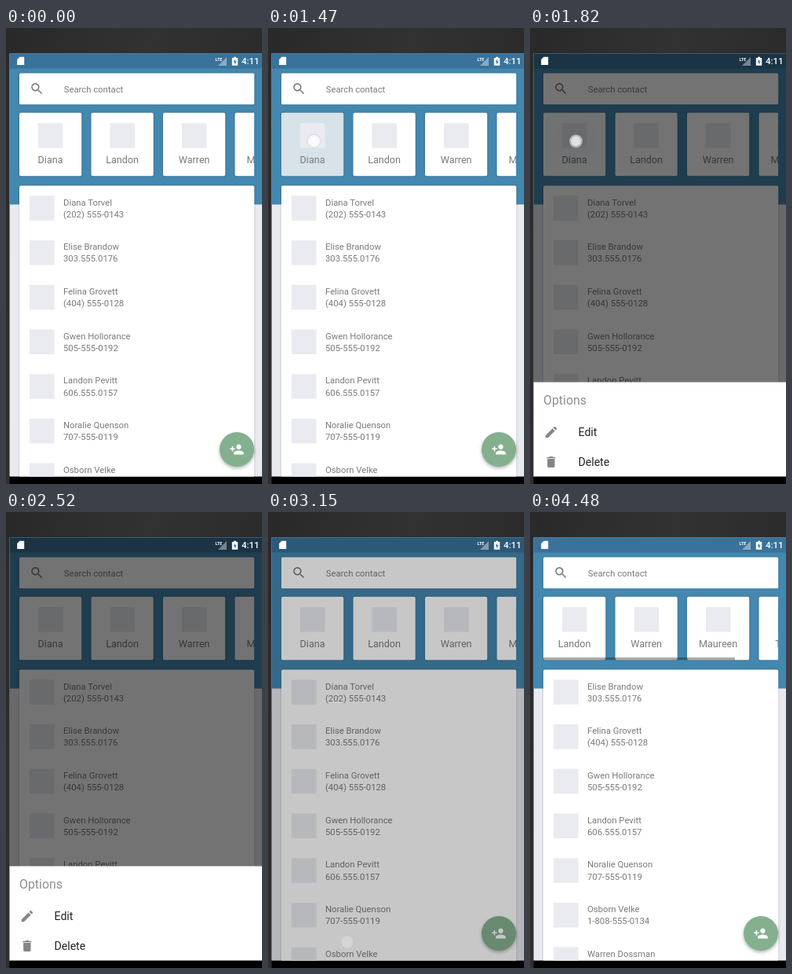
Animation of 326x580 px, one loop 4760 ms. Source, as an HTML page:

```html
<!DOCTYPE html>
<html lang="en">
<head>
<meta charset="utf-8">
<title>Contact list</title>
<style>
html, body { margin: 0; width: 326px; height: 580px; overflow: hidden; background: #000; }
svg { display: block; font-family: Roboto, Arial, sans-serif; }
.card { fill: #fff; filter: drop-shadow(0 .8px .8px rgba(0,0,0,.25)); }
.pic { fill: #eaebf0; }
.label { font-size: 12.6px; fill: #7a7a7a; text-anchor: middle; }
.row { font-size: 11.3px; fill: #7b7b7b; }
.menu { font-size: 14.1px; fill: #222; }
</style>
</head>
<body>
<svg width="326" height="580" viewBox="0 0 326 580">
  <defs>
    <linearGradient id="wall" x2="1" y2=".4">
      <stop stop-color="#292929"/><stop offset=".5" stop-color="#323232"/><stop offset="1" stop-color="#292929"/>
    </linearGradient>
    <clipPath id="screen"><path d="M4.6 32.6H326V570.6H4.6z"/></clipPath>
    <clipPath id="strip"><path d="M4 100H316V196H4z"/></clipPath>
    <clipPath id="first"><rect x="17" y="107.8" width="79.2" height="80.4" rx="2"/></clipPath>
  </defs>
  <rect width="326" height="580" fill="url(#wall)"/>
  <path d="M4.6 570H326V580H4.6z"/>
  <g clip-path="url(#screen)">
    <path d="M4 32H326V571H4z" fill="#e9eaf0"/>
    <path d="M4 32H326V224.4H4z" fill="#4487af"/>
    <path d="M4 32H326V51.4H4z" fill="#39729a"/>
    <rect class="card" x="17" y="57.5" width="299.2" height="39.7" rx="1.5"/>
    <path transform="translate(29.8 67.7) scale(.8)" fill="#7b7b7b" d="M15.5 14h-.79l-.28-.27A6.47 6.47 0 0 0 16 9.5 6.5 6.5 0 1 0 9.5 16c1.61 0 3.09-.59 4.23-1.57l.27.28v.79l5 4.99L20.49 19l-4.99-5zm-6 0C7.01 14 5 11.99 5 9.5S7.01 5 9.5 5 14 7.01 14 9.5 11.99 14 9.5 14z"/>
    <text class="row" x="73.7" y="81.8">Search contact</text>
    <g clip-path="url(#strip)">
      <g id="cards"></g>
      <g clip-path="url(#first)" fill="#37708f">
        <rect id="press" x="17" y="107" width="80" height="82"/>
        <circle id="ripple" cx="57" cy="144"/>
      </g>
      <g id="labels"></g>
      <rect id="bar" x="17" y="185" width="244" height="3.2" fill="#000" opacity=".33"/>
    </g>
    <rect class="card" x="17" y="200.6" width="299.2" height="380" rx="2"/>
    <g id="list"></g>
    <circle cx="294" cy="536" r="22" fill="#84b08f" style="filter:drop-shadow(0 2px 2px rgba(0,0,0,.3))"/>
    <path transform="translate(284.4 526.4) scale(.8)" fill="#fff" d="M15 12c2.21 0 4-1.79 4-4s-1.79-4-4-4-4 1.79-4 4 1.79 4 4 4zm-9-2V7H4v3H1v2h3v3h2v-3h3v-2H6zm9 4c-2.67 0-8 1.34-8 4v2h16v-2c0-2.66-5.33-4-8-4z"/>
    <path id="dim" d="M4 32H326V571H4z"/>
  </g>
  <g fill="#fff">
    <path d="M17.4 36.8H23.2V47H14.2V40z"/>
    <path d="M281 37V48H270z" opacity=".4"/>
    <text x="266.5" y="41.6" font-size="5.4" font-weight="700">LTE</text>
    <path d="M290 36.8h3v1.1h2.2V47.8h-7.4V37.9H290z"/>
    <path d="M292 39.5l-2.3 4h1.6v3l2.4-4H292z" fill="#39729a"/>
    <text x="300" y="46" font-size="11.5" font-weight="500">4:11</text>
  </g>
  <g id="sheet">
    <path d="M4.6 450.4H326V571H4.6z" fill="#fff"/>
    <path d="M4.6 570.6H326V580H4.6z"/>
    <text x="17" y="479" font-size="15.9" fill="#8f8f8f">Options</text>
    <g fill="#858585">
      <path transform="translate(17.4 504.5) scale(.8)" d="M3 17.25V21h3.75L17.81 9.94l-3.75-3.75L3 17.25zM20.71 7.04c.39-.39.39-1.02 0-1.41l-2.34-2.34c-.39-.39-1.02-.39-1.41 0l-1.83 1.83 3.75 3.75 1.83-1.83z"/>
      <path transform="translate(17.5 542.6) scale(.78)" d="M6 19c0 1.1.9 2 2 2h8c1.1 0 2-.9 2-2V7H6v12zM19 4h-3.5l-1-1h-5l-1 1H5v2h14V4z"/>
    </g>
    <text class="menu" x="61.5" y="519">Edit</text>
    <text class="menu" x="61.5" y="557">Delete</text>
  </g>
  <g id="touch" fill="#fff">
    <circle r="8.6" fill-opacity=".5" stroke="#000" stroke-opacity=".1"/>
    <circle r="6.2" fill-opacity=".6"/>
  </g>
</svg>
<script>
const LOOP = 4760;
const favourites = ["Diana", "Landon", "Warren", "Maureen", "Tobias"];
const contacts = [
  ["Diana Torvel", "(202) 555-0143"],
  ["Elise Brandow", "303.555.0176"],
  ["Felina Grovett", "(404) 555-0128"],
  ["Gwen Hollorance", "505-555-0192"],
  ["Landon Pevitt", "606.555.0157"],
  ["Noralie Quenson", "707-555-0119"],
  ["Osborn Velke", "1-808-555-0134"],
  ["Warren Dossman", "909.555.0165"]
];
const el = id => document.getElementById(id);
const set = (id, attrs) => {
  for (const k in attrs) el(id).setAttribute(k, attrs[k]);
};
const ramp = (t, from, to) => Math.min(1, Math.max(0, (t - from) / (to - from)));
const easeOut = p => 1 - (1 - p) ** 2;
const cardX = i => 17 + 91.5 * i;

el("cards").innerHTML = [0, 1, 2, 3].map(i =>
  `<rect class="card" x="${cardX(i)}" y="107.8" width="79.2" height="80.4" rx="2"/>`).join("");

let shown = -1;
function fill(skip) {
  if (skip === shown) return;
  shown = skip;
  el("labels").innerHTML = favourites.slice(skip, skip + 4).map((name, i) =>
    `<rect class="pic" x="${cardX(i) + 24}" y="121" width="31.5" height="31.5"/>
     <text class="label" x="${cardX(i) + 39.6}" y="172">${name}</text>`).join("");
  el("list").innerHTML = contacts.slice(skip, skip + 7).map(([name, phone], i) =>
    `<g transform="translate(0 ${56.7 * i})">
       <rect class="pic" x="30" y="213.4" width="31.5" height="31.5"/>
       <text class="row" x="73" y="225.5">${name}</text>
       <text class="row" x="73" y="240.8">${phone}</text>
     </g>`).join("");
}

function draw(t) {
  const removed = t >= 3270;
  fill(removed ? 1 : 0);
  el("bar").style.display = removed ? "" : "none";

  // long press on the first card
  const release = 1 - ramp(t, 1620, 1830);
  const spread = ramp(t, 1490, 1610);
  set("press", { opacity: (0.2 * ramp(t, 1120, 1260) + 0.08 * spread) * release });
  set("ripple", { r: 29 * spread, opacity: 0.28 * release });

  // bottom sheet and backdrop
  const open = easeOut(ramp(t, 1495, 1750));
  const close = ramp(t, 2960, 3140) ** 2;
  set("sheet", {
    transform: `translate(0 ${121 * (1 - open + close)})`,
    opacity: open * (1 - close)
  });
  set("dim", { opacity: 0.55 * easeOut(ramp(t, 1505, 1760)) * (1 - ramp(t, 3000, 3250)) });

  // finger marker
  const holding = t >= 1120 && t < 2240;
  const tapping = t >= 2870 && t < 3220;
  set("touch", {
    transform: holding ? "translate(58.5 143.8)" : "translate(101 547)",
    opacity: holding ? 1 : tapping ? 1 - 0.65 * ramp(t, 2960, 3150) : 0
  });
}

const start = performance.now();
function frame() {
  draw((performance.now() - start) % LOOP);
  requestAnimationFrame(frame);
}
frame();
</script>
</body>
</html>
```
